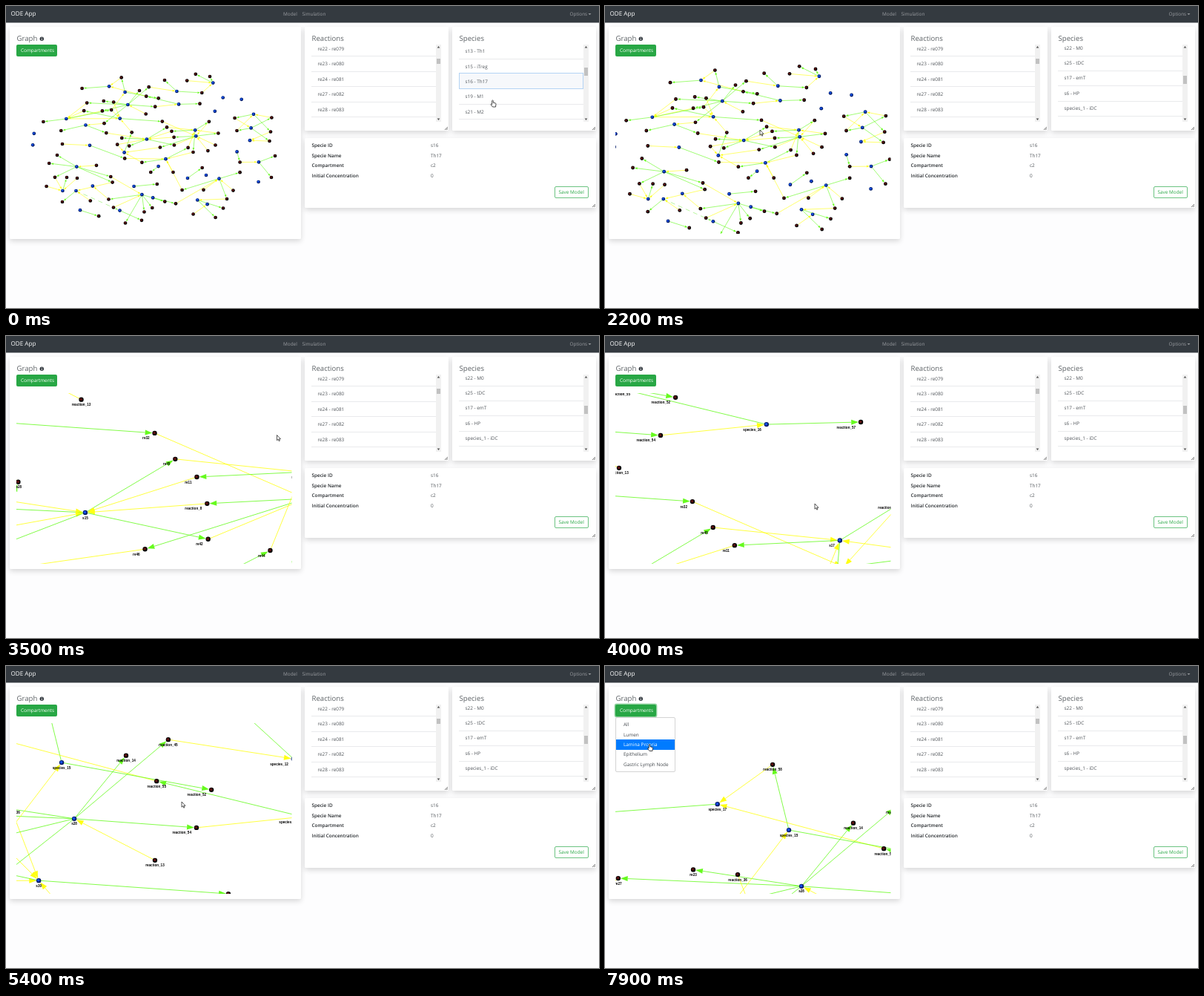
An HTML page with a canvas for the animation above (8000 ms loop, 800 px wide and 407 px high).

```html
<!DOCTYPE html>
<html lang="en">
<head>
<meta charset="utf-8">
<title>ODE App</title>
<style>
html, body { margin: 0; width: 100%; height: 100%; overflow: hidden; background: #fdfdfe; }
body { position: relative; font: 6.4px/20px "Open Sans", "Noto Sans", sans-serif; color: #50555a; text-rendering: geometricPrecision; }
body *, svg { position: absolute; box-sizing: border-box; }
.text { white-space: pre; height: 20px; }
.card { background: #fff; border-radius: 1.5px; box-shadow: 0 3px 7px rgba(0,0,0,.15); }
.list { overflow: hidden; left: 0; top: 0; }
.line { height: 1px; background: #e9eaec; }
.bar { background: #f1f1f1; }
.thumb { background: #c1c1c1; }
.picked { background: #f6f8fb; border: 1px solid #b4d3f4; }
#nav { background: #343a40; border-bottom: 1px solid #999c9f; }
#toggle { border-radius: 2px; background: #28a745; }
#menu { background: #fff; border: 1px solid #d4d4d4; border-radius: 2px; }
#save { border: 1px solid #6cc382; border-radius: 2px; }
svg { overflow: visible; left: 0; top: 0; }
</style>
</head>
<body>
<script>
const LOOP = 8000, STEP = 100;
const VIEW = { x: 14, y: 77, w: 371.5, h: 230 };
const FOCUS = { x: 209, y: 168 };
const MIDDLE = { x: 197, y: 194 };

// ---------- page ----------
function box(x, y, w, h, cls = '', parent = document.body) {
  const el = document.createElement('div');
  el.className = cls;
  el.style.cssText = `left:${x}px;top:${y}px;width:${w}px;height:${h}px`;
  parent.append(el);
  return el;
}
function text(x, y, str, style = '', parent = document.body) {
  const el = document.createElement('div');
  el.className = 'text';
  el.textContent = str;
  el.style.cssText = `left:${x}px;top:${y - 10}px;${style}`;
  parent.append(el);
  return el;
}
function svg(markup) {
  const el = document.createElementNS('http://www.w3.org/2000/svg', 'svg');
  el.setAttribute('width', 1);
  el.setAttribute('height', 1);
  el.innerHTML = markup;
  document.body.append(el);
  return el;
}
function list(x, first, items, thumbY, thumbH, picked) {
  const PITCH = 20.4;
  const port = box(x, 52, 175, 104, 'list');
  const rows = box(0, 0, 168, 400, '', port);
  items.forEach((item, i) => {
    const y = first - 52 + i * PITCH;
    box(0, Math.round(y + 10), 168, 1, 'line', rows);
    if (i === picked) box(0, Math.round(y - 11), 168, 21.5, 'picked', rows);
    text(8.5, y + .6, item, '', rows);
  });
  box(168, 0, 7, 104, 'bar', port);
  const thumb = box(169, thumbY - 52, 5, thumbH, 'thumb', port);
  svg(`<path d="M${x + 169.7} 56.5l1.8-2.4 1.8 2.4zM${x + 169.7} 151.5l1.8 2.4 1.8-2.4z" fill="#505050"/>`);
  return { rows, thumb };
}

box(0, 0, 800, 23).id = 'nav';
text(6.5, 11, 'ODE App', 'font-size:8.1px;color:#fff');
const navStyle = 'color:#9a9da0';
text(374, 11, 'Model', navStyle);
text(399.5, 11, 'Simulation', navStyle);
text(760.5, 11, 'Options', navStyle);
svg('<path d="M785.5 10h4l-2 2z" fill="#9a9da0"/>');

box(5, 28, 393, 286, 'card');
box(402.5, 28, 194, 140, 'card');
box(601.5, 28, 194.5, 140, 'card');
box(402.5, 178, 393.5, 94, 'card');
svg([[596, 167], [795, 167], [795, 271]].map(([x, y]) =>
  `<path d="M${x - 4} ${y}L${x} ${y - 4}M${x - 2} ${y}L${x} ${y - 2}" stroke="#555" stroke-width=".8"/>`).join(''));

const headStyle = 'font-size:9.6px;color:#5d6266';
text(14.5, 44, 'Graph', headStyle);
text(412.5, 44, 'Reactions', headStyle);
text(611.5, 44, 'Species', headStyle);
svg('<circle cx="48.3" cy="44.3" r="2.7" fill="#343a40"/><path d="M48.3 42.4v.9M48.3 43.9v2.2" stroke="#fff" stroke-width=".9"/>');

list(412, 57.4, ['re22 - re079', 're23 - re080', 're24 - re081', 're27 - re082', 're28 - re083'], 71, 7);
const species = list(611, 60.5, ['s13 - Th1', 's15 - iTreg', 's16 - Th17', 's19 - M1', 's21 - M2', 's22 - M0',
  's25 - tDC', 's17 - emT', 's6 - HP', 'species_1 - iDC', 'species_2 - E_iDC'], 83, 11, 2);

[['Specie ID', 's16'], ['Specie Name', 'Th17'], ['Compartment', 'c2'], ['Initial Concentration', '0']]
  .forEach(([key, value], i) => {
    const y = 188.3 + i * 13.4;
    text(412.5, y, key, 'font-weight:600;color:#212529');
    text(573, y, value);
  });
box(740, 243, 46, 16).id = 'save';
text(745.5, 251, 'Save Model', 'color:#28a745');

const canvas = document.createElement('canvas');
canvas.width = 800;
canvas.height = 407;
canvas.style.cssText = 'left:0;top:0';
document.body.append(canvas);
const ctx = canvas.getContext('2d');

const toggle = box(14, 52, 55, 16);
toggle.id = 'toggle';
text(20, 60, 'Compartments', 'color:#fff');

const menu = box(14, 68.5, 81, 74.5);
menu.id = 'menu';
const mark = box(0, 30, 79, 13.4, '', menu);
const items = ['All', 'Lumen', 'Lamina Propria', 'Epithelium', 'Gastric Lymph Node']
  .map((name, i) => text(10, 9.6 + i * 13.4, name, 'color:#43484d', menu));

const arrow = svg('<path d="M0 0v7.2l1.7-1.5 1.1 2.5 1.1-.5-1.1-2.4h2.2z" fill="#fff" stroke="#111" stroke-width=".7"/>');
const hand = svg('<path d="M-.8 5V.6q.8-1.2 1.6 0V3.2l3 .8q.8.3.7 1.2L4 9H0L-2.6 5.6q.4-1.2 1.8 0z" fill="#fff" stroke="#111" stroke-width=".75"/>');

// ---------- graph ----------
const nodes = {}, edges = [];
let count = 0;
function S(id, x, y) { nodes[id] = { id, x, y, kind: 'species' }; }
// A reaction, the species it takes and the species it gives.
function R(x, y, takes, gives, id = 're' + (60 + count++)) {
  nodes[id] = { id, x, y, kind: 'reaction' };
  for (const s of takes.split(' ').filter(Boolean)) edges.push({ from: s, to: id, color: '#66fa1e' });
  for (const s of gives.split(' ').filter(Boolean)) edges.push({ from: id, to: s, color: '#ffff14' });
}

// top
S('species_17', 139.1, 108.3); S('species_15', 160.6, 116.1); S('s28', 164.4, 133);
S('s30', 153.7, 151.6); S('species_12', 230.4, 115); S('species_16', 233.1, 132.4);
S('species_13', 279.3, 103.6); S('species_14', 281.8, 141.8);
S('species_18', 292.7, 123.5); S('species_19', 317.7, 125.8);
R(155.7, 96.4, 'species_15', 'species_17', 'reaction_58');
R(102.6, 111, 'species_17', '');
R(180, 114, 's28', '', 'reaction_14');
R(192.7, 109.2, 's28', 'species_12', 'reaction_45');
R(189.2, 121.7, 'species_16', 'species_17', 'reaction_55');
R(205.7, 124.3, 'species_15', '', 'reaction_52');
R(201.2, 135.7, 's28', 'species_16', 'reaction_54');
R(188.7, 145.5, '', 's28', 'reaction_13');
R(214, 100, 'species_12', '');
R(244.2, 100.6, '', 'species_13');
R(255.8, 91.8, 'species_13', '');
R(275, 95, 'species_13', '');
R(264.3, 117, 'species_12', 'species_13');
R(261.5, 131.7, 'species_16', '', 'reaction_57');

// left
S('s2', 81.3, 152); S('s8', 107.5, 160.5); S('s10', 113, 187.8);
S('s3', 37.8, 171.8); S('s4', 36.2, 187.3);
edges.push({ from: 's2', to: 's30', color: '#ffff14' });
R(109.2, 130.6, 's28', 's2', 're27');
R(131.8, 128, 's28', '', 're23');
R(145.2, 129.5, '', 's30', 'reaction_36');
R(105.2, 141.2, 's30', 's2');
R(129.9, 141.4, 's28', 's2');
R(142.2, 140.1, 's2', 'species_15 s30', 'reaction_51');
R(50.4, 156, 's2', '');
R(74.3, 168, 's8', '');
R(132.5, 158.2, 's28', 's8');
R(76, 186, '', 's10');
R(135.3, 171.1, 's8', 's15', 're35');

// middle
S('s15', 189.9, 179.5); S('s29', 159.6, 197.4); S('s13', 215.5, 206.2); S('species_11', 205.6, 216.1);
S('s17', 255.2, 167.3); S('s16', 256.3, 175.3); S('species_4', 245, 232); S('species_5', 270, 228);
R(169.7, 170.3, 's29', 's30', 're28');
R(156.3, 177.9, 's15', '', 're49');
R(150.2, 186.7, '', 's15 s29', 'reaction_29');
R(166.2, 188.6, 's15', '', 'reaction_40');
R(160.2, 205.4, 's10', 's13', 're33');
R(183.4, 210.8, 's13', 's29', 're47');
R(210.8, 155.6, 's30', 's16', 're32');
R(217, 163.4, 's15', 's17', 're45');
R(223.5, 168.8, 's17', 's15', 're11');
R(226.6, 176.8, 's16', 's15', 'reaction_8');
R(226.9, 187.5, 's15', 's16', 're42');
R(207.9, 190.5, 's16', 's29', 're46');
R(245.6, 190.9, 's13', 's17', 're44');
R(252.5, 197, 's17', 's13', 'reaction_10');
R(272.4, 195.1, '', 's16', 'reaction_33');
R(273.9, 155.8, 's17', 's16', 'reaction_11');
R(286.4, 171.5, 's16', 's17');
R(282.5, 187.5, '', 's16');
R(264.7, 218, 'species_4', '', 'reaction_28');
R(195.3, 224, 'species_11', '');
R(225.5, 224, '', 's13');

// right
S('s41', 334, 145.8); S('s42', 330.6, 164.4); S('s43', 329, 181.2);
S('s44', 311.6, 196.4); S('s45', 341, 210.3); S('s46', 340.6, 237);
R(308.6, 151, 's41', 's42');
R(358.4, 150.5, 's42', 's41');
R(357, 169.5, 's41', 's43');
R(311.5, 168, 's42', 's41');
R(355.5, 182, 's42', 's43');
R(315.6, 210.5, 's44', 's45');
R(363, 202, 's45', '');
R(358, 231, 's45', '');

// bottom left
S('s51', 95.3, 216.6); S('s52', 76.4, 249); S('s53', 94.5, 249); S('s54', 116.9, 242.6);
S('s55', 100, 275.2); S('s56', 153.5, 275.6);
edges.push({ from: 's53', to: 's56', color: '#8cf060', dash: true });
R(58.2, 212, 's51', '');
R(69, 201, 's51', '');
R(122, 214.8, '', 's51');
R(141.3, 230, 's51', 's57');
R(143.6, 237.6, 's51', 's53');
R(66, 230.8, 's51', 's52');
R(82, 231, 's52', '');
R(96, 232, '', 's52');
R(54.6, 243, '', 's52');
R(76, 264, 's53', '');
R(113.8, 262.5, '', 's53');
R(138.5, 260.5, 's57', 's54');
R(145, 271.5, '', 's57');
R(125.2, 283.2, 's55', '');

// bottom right
S('s57', 183.4, 254.2); S('s58', 198.2, 258.4); S('s59', 172.6, 243);
S('s60', 258.3, 261.5); S('s61', 271.6, 267.2); S('s62', 287.5, 232.7);
R(203.8, 240, 's59', '');
R(214.3, 263.6, 's57', '');
R(229, 266.3, 's58', 's62');
R(197.3, 272, 's57', '');
R(186.5, 277.5, 's57', '');
R(183, 288.8, 's56', '');
R(161, 292.5, 's57', '');
R(237.6, 248, 's62', 's13');
R(266.5, 247.8, '', 's62');
R(315.6, 224.2, 's62', '');
R(306.5, 248.6, '', 's62');
R(298, 260, 's62', 's60');
R(293, 272.5, 's60', '');
R(282.6, 285, 's60', '');
R(252.6, 280.5, '', 's61');

const COLORS = { species: ['#1450e6', '#001a66'], reaction: ['#5a1010', '#000'] };

function drawEdge(e, at, r, len) {
  const a = at(nodes[e.from]), b = at(nodes[e.to]);
  const d = Math.hypot(b.x - a.x, b.y - a.y);
  const ux = (b.x - a.x) / d, uy = (b.y - a.y) / d;
  const tx = b.x - ux * r, ty = b.y - uy * r;
  const bx = tx - ux * len, by = ty - uy * len, w = len * .36;
  ctx.strokeStyle = ctx.fillStyle = e.color;
  ctx.setLineDash(e.dash ? [6, 5] : []);
  ctx.beginPath();
  ctx.moveTo(a.x, a.y);
  ctx.lineTo(bx, by);
  ctx.stroke();
  ctx.beginPath();
  ctx.moveTo(tx, ty);
  ctx.lineTo(bx - uy * w, by + ux * w);
  ctx.lineTo(bx + uy * w, by - ux * w);
  ctx.fill();
}
function disc(x, y, r, color) {
  ctx.fillStyle = color;
  ctx.beginPath();
  ctx.arc(x, y, r, 0, 7);
  ctx.fill();
}
function drawGraph(zoom, panX, panY) {
  const at = p => ({
    x: FOCUS.x + zoom * (p.x - FOCUS.x) + panX,
    y: FOCUS.y + zoom * (p.y - FOCUS.y) + panY
  });
  const r = 2.35 * zoom ** .2;
  ctx.clearRect(0, 0, 800, 407);
  ctx.save();
  ctx.beginPath();
  ctx.rect(VIEW.x, VIEW.y, VIEW.w, VIEW.h);
  ctx.clip();
  ctx.lineWidth = .6 * zoom ** .2;
  for (const e of edges) drawEdge(e, at, r, 3.5 * zoom ** .68);
  ctx.font = 'bold 4.6px "Liberation Sans", Arial, sans-serif';
  for (const n of Object.values(nodes)) {
    const { x, y } = at(n), [core, rim] = COLORS[n.kind];
    disc(x, y, r, rim);
    disc(x - r * .12, y - r * .12, r * .58, core);
    if (zoom < 2) continue;
    const left = n.x > MIDDLE.x;
    ctx.fillStyle = '#000';
    ctx.textAlign = left ? 'right' : 'center';
    ctx.fillText(n.id, left ? x - 7 : x, y + (n.y > MIDDLE.y ? -3.2 : 8.6));
  }
  ctx.restore();
}

// ---------- time ----------
const ZOOM = [[1800, 1], [2200, 1.137], [2300, 1.137], [2500, 1.55], [2600, 1.55], [2800, 2.62], [3000, 4.48]];
const PAN = [[3400, 0, 0], [4000, -99.1, 110.6], [4700, -99.1, 110.6], [5400, 82.9, 194.6], [6100, 255.9, 285.6]];
const POINTER = [[400, 656.5, 127], [900, 180, 140], [1000, 184, 136], [1400, 202, 171], [1800, 202, 171],
  [2100, 209, 167], [3000, 209, 167], [3400, 382, 115], [4000, 283, 226], [4700, 55, 99], [5400, 237, 183],
  [6100, 372, 284], [6200, 372, 284], [6700, 50, 57.5], [7100, 50, 57.5], [7300, 60, 105.5]];
const SCROLL = [[0, 0], [500, 106.5]];

function track(keys, t) {
  const i = keys.findIndex(k => k[0] > t);
  if (i === 0) return keys[0].slice(1);
  if (i < 0) return keys[keys.length - 1].slice(1);
  const a = keys[i - 1], b = keys[i], f = (t - a[0]) / (b[0] - a[0]);
  return a.slice(1).map((v, j) => v + (b[j + 1] - v) * f);
}
const inside = (x, y, l, t, r, b) => x >= l && x <= r && y >= t && y <= b;

function render(t) {
  const [scroll] = track(SCROLL, t);
  species.rows.style.top = -scroll + 'px';
  species.thumb.style.top = 31 + scroll * .104 + 'px';

  drawGraph(track(ZOOM, t)[0], ...track(PAN, t));

  const [x, y] = track(POINTER, t);
  const open = t >= 6900;
  const overToggle = inside(x, y, 14, 52, 69, 68);
  const overMenu = open && inside(x, y, 14, 69, 95, 143);
  const overList = inside(x, y, 412, 52, 580, 156) || inside(x, y, 611, 52, 779, 156);
  toggle.style.background = overToggle ? '#218838' : '#28a745';
  toggle.style.boxShadow = open ? '0 0 0 1.4px rgba(40,167,69,.5)' : 'none';
  menu.style.display = open ? 'block' : 'none';

  const pressed = t >= 7900, row = Math.floor((y - 72.5) / 13.4);
  mark.style.top = 3 + row * 13.4 + 'px';
  mark.style.background = !overMenu || row < 0 ? 'none' : pressed ? '#007bff' : '#f4f5f6';
  items[2].style.color = pressed ? '#fff' : '#43484d';

  const pointing = overToggle || overMenu || overList;
  hand.style.display = pointing ? 'block' : 'none';
  arrow.style.display = pointing ? 'none' : 'block';
  hand.style.transform = arrow.style.transform = `translate(${x}px,${y}px)`;
}

const start = performance.now();
function tick() {
  const t = (performance.now() - start) % LOOP;
  render(Math.floor(t / STEP) * STEP);
  requestAnimationFrame(tick);
}
tick();
</script>
</body>
</html>
```
